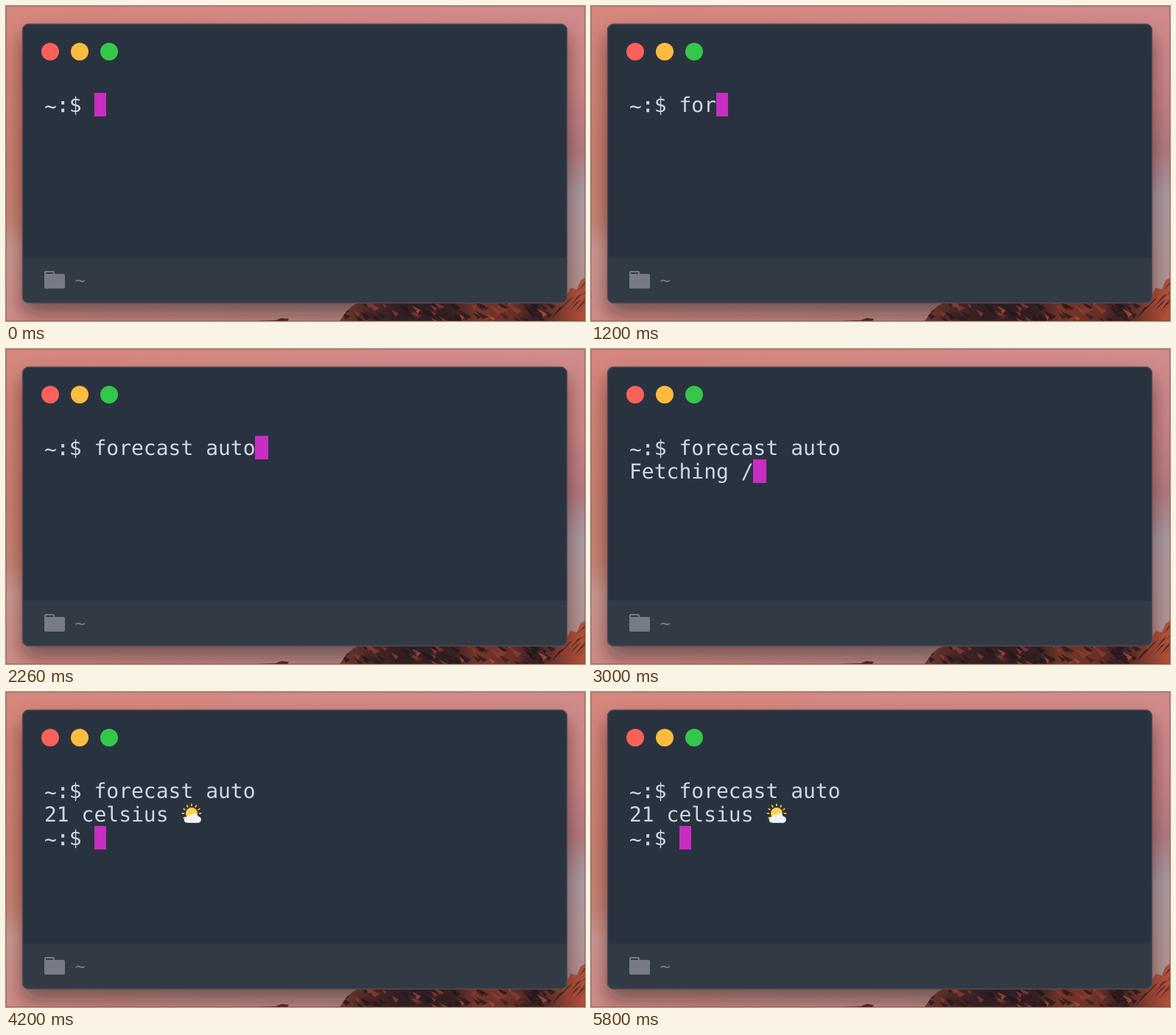
Recreate the animation shown at these times as an HTML page. Size 786 px wide and 428 px high, loop 5870 ms.

```html
<!DOCTYPE html>
<html lang="en">
<head>
<meta charset="utf-8">
<title>Terminal forecast</title>
<style>
  html, body { margin: 0; width: 100%; height: 100%; overflow: hidden; background: #d2857e; }
  svg { display: block; width: 100vw; height: 100vh; }
  text { font-family: "DejaVu Sans Mono", monospace; font-size: 28px; fill: #cdd7e5; white-space: pre; text-rendering: geometricPrecision; }
  .colon { stroke: #cdd7e5; stroke-width: .5; }
</style>
</head>
<body>
<svg viewBox="0 0 786 428">
  <defs>
    <linearGradient id="leftSky" x2="0" y2="1">
      <stop offset="0" stop-color="#d6877e"/>
      <stop offset=".2" stop-color="#d28377"/>
      <stop offset=".5" stop-color="#c9806e"/>
      <stop offset=".68" stop-color="#c78474"/>
      <stop offset=".78" stop-color="#cc9893"/>
      <stop offset="1" stop-color="#d08b87"/>
    </linearGradient>
    <linearGradient id="rightSky" x2="0" y2="1">
      <stop offset="0" stop-color="#d18b8d"/>
      <stop offset=".25" stop-color="#cb8486"/>
      <stop offset=".46" stop-color="#b27a80"/>
      <stop offset=".6" stop-color="#aa9aa2"/>
      <stop offset=".74" stop-color="#b39799"/>
      <stop offset="1" stop-color="#b18f90"/>
    </linearGradient>
    <linearGradient id="across">
      <stop offset=".1" stop-color="#fff" stop-opacity="0"/>
      <stop offset=".95" stop-color="#fff"/>
    </linearGradient>
    <linearGradient id="stone">
      <stop offset="0" stop-color="#74392f"/>
      <stop offset=".12" stop-color="#4c2726"/>
      <stop offset=".25" stop-color="#301e23"/>
      <stop offset=".45" stop-color="#2f1d21"/>
      <stop offset=".56" stop-color="#753529"/>
      <stop offset=".7" stop-color="#6a3028"/>
      <stop offset=".8" stop-color="#3a2023"/>
      <stop offset=".92" stop-color="#8c3f30"/>
      <stop offset="1" stop-color="#b45139"/>
    </linearGradient>
    <mask id="rightFade"><rect width="786" height="428" fill="url(#across)"/></mask>
    <filter id="shadow" x="-10%" y="-10%" width="120%" height="130%">
      <feDropShadow dx="0" dy="15" stdDeviation="13" flood-color="#1a1414" flood-opacity=".5"/>
    </filter>
    <clipPath id="ridge">
      <path d="M453 428L462 415L471 407L486 400H740L762 391L767 383L775 385L780 373L786 369V428Z"/>
    </clipPath>
    <clipPath id="frame"><rect x="22" y="24" width="740" height="380" rx="9"/></clipPath>
  </defs>

  <rect width="786" height="428" fill="url(#leftSky)"/>
  <rect width="786" height="428" fill="url(#rightSky)" mask="url(#rightFade)"/>
  <path d="M338 428L366 427L374 424L384 425L382 428Z" fill="#572d2a"/>

  <rect x="22" y="24" width="740" height="380" rx="9" fill="#293340" filter="url(#shadow)"/>
  <g id="rocks" clip-path="url(#ridge)">
    <rect x="450" y="360" width="336" height="68" fill="url(#stone)"/>
  </g>
  <rect x="22" y="24" width="740" height="380" rx="9" fill="#293340"/>
  <rect y="342" x="22" width="740" height="62" fill="#323a46" clip-path="url(#frame)"/>
  <rect x="22.5" y="24.5" width="739" height="379" rx="8.5" fill="none" stroke="#514d50" stroke-width="1.4"/>
  <circle cx="60" cy="62" r="12" fill="#fc605b"/>
  <circle cx="100" cy="62" r="12" fill="#fdbc40"/>
  <circle cx="140" cy="62" r="12" fill="#34c84a"/>

  <path d="M54 360H64Q66 360 66 362V364H78Q80 364 80 366V382Q80 384 78 384H54Q52 384 52 382V362Q52 360 54 360Z" fill="#777b85"/>
  <path d="M54 363H64" stroke="#323a46" stroke-width="2"/>
  <text x="93.5" y="381" style="font-size:24px;fill:#777b85">~</text>

  <rect id="cursor" height="32" fill="#c92dc1"/>
  <text x="52" y="144"><tspan dy="1.5">~</tspan><tspan class="colon" dy="-1.5">:</tspan>$ <tspan id="command"></tspan></text>
  <text id="output" x="52" y="176"></text>
  <g id="result">
    <text x="52" y="208"><tspan dy="1.5">~</tspan><tspan class="colon" dy="-1.5">:</tspan>$</text>
    <g id="rays" stroke="#f5a92b" stroke-width="2" stroke-linecap="round"></g>
    <circle cx="252" cy="165" r="8" fill="#ffd34e"/>
    <path d="M246 177.5a4 4 0 0 1-.5-8a5 5 0 0 1 6-2.500a5.500 5.500 0 0 1 9.500 2a4.400 4.400 0 0 1 1 8.500Z" fill="#eff3f8"/>
    <path d="M246 177.500H262" stroke="#c9d3df"/>
  </g>
  <rect x=".5" y=".5" width="785" height="427" fill="none" stroke="#5b3035" stroke-opacity=".3"/>
</svg>
<script>
  const LOOP = 5870, COMMAND = 'forecast auto';
  const TYPE_START = 930, TYPE_STEP = 105;
  const FETCH_START = 2470, SPIN_STEP = 100, FETCH_END = 3720;
  const LEFT = 52, ADVANCE = 28 * 1233 / 2048;
  const byId = id => document.getElementById(id);
  const command = byId('command'), output = byId('output');
  const result = byId('result'), cursor = byId('cursor');

  function add(parent, name, attributes) {
    const node = document.createElementNS('http://www.w3.org/2000/svg', name);
    for (const key in attributes) node.setAttribute(key, attributes[key]);
    byId(parent).append(node);
  }

  // Thin slanted streaks: lit ones lie mostly on the sunny slopes.
  function drawRocks() {
    let seed = 17;
    const random = () => (seed = seed * 16807 % 2147483647) / 2147483647;
    const dark = ['#24171c', '#3a2023'], lit = ['#8a3f30', '#b3523a'];
    for (let i = 0; i < 260; i++) {
      const x = 446 + random() * 340, y = 366 + random() * 60;
      const length = 5 + random() * 15, slope = x > 735 ? -1 : .5;
      const sunny = x > 740 ? .6 : x > 615 && x < 700 ? .5 : .2;
      const shades = random() < sunny ? lit : dark;
      add('rocks', 'path', {
        d: `M${x} ${y}l${length} ${length * slope}l${-length * .4} ${3 + random() * 2}Z`,
        fill: shades[Math.floor(random() * 2)],
        opacity: .75
      });
    }
  }

  function drawRays() {
    for (let i = 0; i < 12; i++) {
      const a = i * Math.PI / 6, c = Math.cos(a), s = Math.sin(a);
      if (s > .4 && c > -.6) continue;
      add('rays', 'line', {
        x1: 252 + 10.5 * c, y1: 165 + 10.5 * s,
        x2: 252 + 12.5 * c, y2: 165 + 12.5 * s
      });
    }
  }

  // Cursor edges land on whole points of a double-density screen.
  const snap = x => 2 * Math.round(x / 2);

  function placeCursor(column, row) {
    const x = LEFT + column * ADVANCE, left = snap(x);
    cursor.setAttribute('x', left);
    cursor.setAttribute('y', 118 + row * 32);
    cursor.setAttribute('width', snap(x + ADVANCE) - left);
  }

  function render(t) {
    const typed = Math.floor((t - TYPE_START) / TYPE_STEP) + 1;
    const count = Math.max(0, Math.min(COMMAND.length, typed));
    const done = t >= FETCH_END;
    let line = '';
    if (done) line = '21 celsius';
    else if (t >= FETCH_START) {
      line = 'Fetching ' + '|/-\\'[Math.floor((t - FETCH_START) / SPIN_STEP) % 4];
    }
    command.textContent = COMMAND.slice(0, count);
    output.textContent = line;
    result.style.display = done ? '' : 'none';
    if (done) placeCursor(4, 2);
    else if (line) placeCursor(line.length, 1);
    else placeCursor(4 + count, 0);
  }

  drawRocks();
  drawRays();
  const start = performance.now();
  function tick() {
    render((performance.now() - start) % LOOP);
    requestAnimationFrame(tick);
  }
  tick();
</script>
</body>
</html>
```
